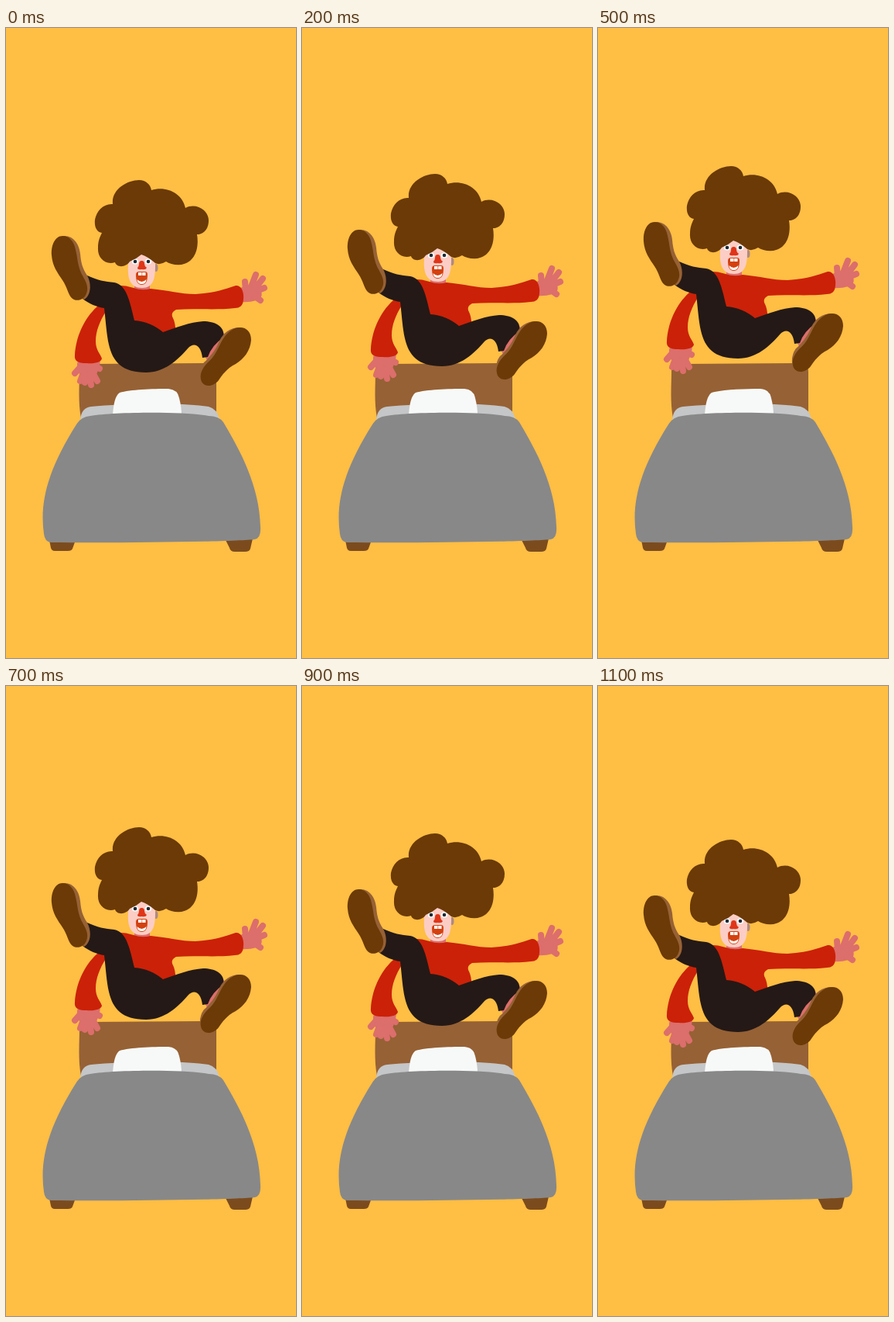
Animation, 375 px wide and 812 px high, one loop 1.2 s. Source, as an HTML page:

```html
<!DOCTYPE html>
<html lang="en">
<head>
<meta charset="utf-8">
<title>Bed jump</title>
<style>
  html, body { margin: 0; width: 100%; height: 100%; overflow: hidden; background: #ffbe44; }
  svg { display: block; width: 100%; height: 100%; }
  .wood { fill: #966135; }
  .leg { fill: #7c4b1d; }
  .hair { fill: #6b3a07; }
  .red { fill: #cb2108; }
  .pants { fill: #241916; }
  .hand { fill: #dc6e6c; }
  .fingers { fill: none; stroke: #dc6e6c; stroke-linecap: round; }
</style>
</head>
<body>
<svg viewBox="0 0 375 812">
  <g id="bed">
    <path class="wood" d="M97 503C93 482 95 460 95 443Q95 433 106 433L262 432Q272 432 272 443V503Z"/>
    <path fill="#c4c6c7" d="M96 504Q98 489 110 488C150 484 230 483 262 488Q273 491 276 504Z"/>
    <path fill="#f7f9f8" d="M138 499C139 485 141 474 147 470C160 466 190 465 210 465Q222 466 224 477Q227 489 227 499Z"/>
    <path class="leg" d="M56 660H90L86 671Q85 674 80 674H63Q59 674 58 670Z"/>
    <path class="leg" d="M283 658H319L316 671Q315 675 309 675H296Q290 675 289 670Z"/>
    <path fill="#888" d="M109 500C140 495 230 494 262 500Q275 500 281 508C302 543 328 590 329 643Q330 657 322 659C300 662 150 664 58 663Q50 662 49 652C43 610 55 568 91 511Q97 501 109 500Z"/>
  </g>

  <g id="jumper">
    <g id="leftHand">
      <path class="hand" d="M93 428H122Q121 441 115 449Q103 457 95 446Q90 438 93 428Z"/>
      <path class="fingers" stroke-width="8" d="M97 436L89 445M100 444L96 455M105 447L102 457M108 447L110 460M112 444L118 455M114 435L121 439"/>
    </g>
    <g id="rightHand">
      <path class="hand" d="M303 335Q318 328 329 337Q334 348 324 351Q314 354 303 353Z"/>
      <path class="fingers" stroke-width="8" d="M310 338L309 327M316 336L323 318M322 336L332 323M324 339L334 335M322 346L329 351"/>
    </g>

    <path class="hand" d="M166 326H186V341H166Z"/>
    <path class="red" d="M140 332Q153 331 165 335Q176 339 187 336C210 338 225 343 245 343C265 342 280 338 297 332C304 331 308 340 307 349C307 358 302 361 296 361C270 364 245 361 220 363Q212 367 216 374Q220 382 219 396L150 410L130 364C121 378 116 391 116 404C116 415 122 420 124 426C123 431 114 433 104 432C95 432 88 430 89 422C90 400 100 375 118 359Z"/>

    <path class="hand" d="M255 419L281 392L288 404L262 432Z"/>
    <path class="pants" d="M105 319C118 325 128 327 140 328C156 331 160 352 166 377C180 378 192 383 203 392C220 386 238 379 255 378C272 378 284 386 281 399Q266 409 261 424L254 425C252 408 243 405 236 412C222 428 205 444 181 444C150 444 138 430 133 408C130 395 129 378 127 361C118 360 107 355 99 349Z"/>

    <g id="leftShoe">
      <path class="wood" d="M74 268C88 267 95 280 96 291C97 303 99 310 105 319C111 330 110 345 101 350L85 340Z"/>
      <path class="hair" d="M73 268C64 268 58 279 59 293C60 307 67 316 73 325C79 334 80 342 84 347C90 354 101 351 104 342C107 335 104 328 100 321C92 308 93 297 90 286C88 275 82 268 73 268Z"/>
    </g>
    <g id="rightShoe">
      <path class="wood" d="M302 386C290 386 281 393 276 403C271 416 262 426 256 431Q250 439 251 450L268 446L296 406Z"/>
      <path class="hair" d="M303 386C311 386 317 392 317 402C316 416 308 426 297 433C285 439 280 447 275 454C268 463 257 463 253 456C249 447 254 438 261 431C271 423 274 412 280 402C286 392 294 386 303 386Z"/>
    </g>

    <g id="face">
      <ellipse cx="194" cy="309" rx="2.5" ry="5" fill="#b08a80"/>
      <path fill="#fbcdc5" d="M158 288V306C157 322 160 335 176 335C191 335 193 322 193 306V288Z"/>
      <g fill="#fff">
        <ellipse cx="167" cy="301" rx="4.2" ry="3.5"/>
        <ellipse cx="184" cy="301" rx="4.2" ry="3.5"/>
      </g>
      <g fill="#1d2a35">
        <circle cx="167" cy="301" r="2.3"/>
        <circle cx="184" cy="301" r="2.3"/>
      </g>
      <path fill="#df3518" d="M172 304Q172 300 175.5 300Q179 300 179 304Q179 307 182 309Q181 312 175.500 311Q170 312 170 309Q172 307 172 304Z"/>
      <path fill="#d4410f" d="M168 318Q168 314 172 314H180Q183 314 183 318C183 326 181 331 175.500 331C170 331 168 326 168 318Z"/>
      <path fill="#fff" d="M171 315H175.500V319H171ZM176.200 315H180.500V319H176.200ZM169.500 324Q175.500 330 181.500 324Q181 330 175.500 330Q170 330 169.500 324Z"/>
    </g>

    <path class="hair" d="M138 227C136 208 157 196 172 196C181 196 187 202 188 209C206 203 228 212 232 232C245 225 262 234 262 248C262 260 255 266 247 266C250 285 244 302 227 305Q214 306 207 301Q199 306 193 303Q184 295 175 292Q168 298 160 301C155 309 143 309 141 302C128 306 118 296 119 283C119 275 121 270 124 264C117 263 114 256 115 247C117 236 126 226 138 227Z"/>
  </g>
</svg>
<script>
  const jumper = document.getElementById('jumper');
  const LOOP = 1200, STEP = 100, TOP_STEP = 5;
  const TRAVEL = 22, SPEED = 4, LOWEST = 3;

  // Triangle bounce in hard steps; the topmost pose is held twice as long.
  function offsetAt(time) {
    const slot = Math.floor((time % LOOP) / STEP);
    const step = slot > TOP_STEP ? slot - 1 : slot;
    const distance = (step * SPEED + LOWEST) % (2 * TRAVEL);
    return LOWEST - Math.min(distance, 2 * TRAVEL - distance);
  }

  function draw(time) {
    jumper.setAttribute('transform', `translate(0 ${offsetAt(time)})`);
    requestAnimationFrame(draw);
  }
  draw(0);
</script>
</body>
</html>
```
